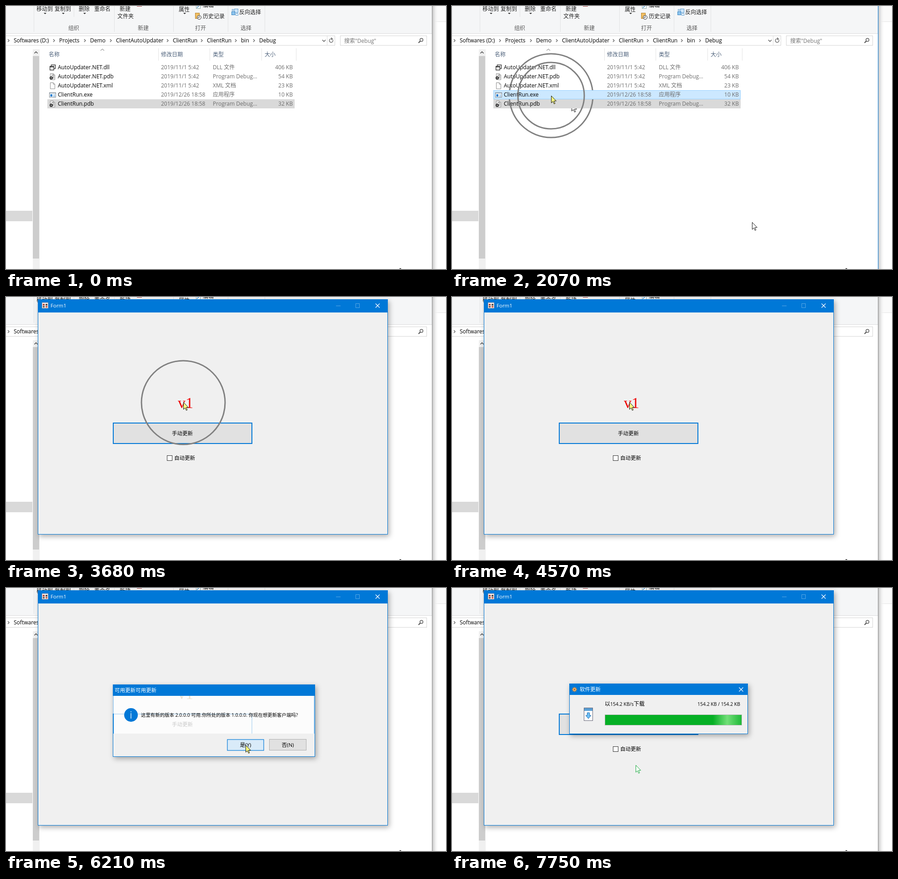
Recreate the animation shown at these times as an HTML page. Size 968x578 px, loop 8 s.

```html
<!DOCTYPE html>
<html lang="zh-CN">
<head>
<meta charset="utf-8">
<title>Client update</title>
<style>
html, body { margin: 0; width: 100%; height: 100%; overflow: hidden; background: #fff; }
svg { display: block; width: 100vw; height: 100vh; }
text { font: 12px 'Open Sans', 'Noto Sans CJK SC', 'Noto Sans CJK', sans-serif; white-space: pre; }
.window { filter: drop-shadow(3px 4px 6px rgba(0, 0, 0, .32)); }
</style>
</head>
<body>
<svg id="stage" viewBox="0 0 968 578" xmlns="http://www.w3.org/2000/svg"></svg>
<script>
const BLUE = '#0078d7';
const LOOP = 8000;

// Markup helpers
const rect = (x, y, w, h, fill, stroke = 'none', extra = '') =>
  `<rect x="${x}" y="${y}" width="${w}" height="${h}" fill="${fill}" stroke="${stroke}" ${extra}/>`;
const text = (x, y, value, fill = '#000', extra = '') =>
  `<text x="${x}" y="${y}" fill="${fill}" ${extra}>${value}</text>`;
const line = (d, stroke, width = 1, extra = '') =>
  `<path d="${d}" fill="none" stroke="${stroke}" stroke-width="${width}" ${extra}/>`;
const shape = (d, fill) => `<path d="${d}" fill="${fill}"/>`;
const group = (id, content, extra = '') => `<g id="${id}" ${extra}>${content}</g>`;
const circle = (x, y, r, fill, extra = '') => `<circle cx="${x}" cy="${y}" r="${r}" fill="${fill}" ${extra}/>`;
const cross = (x, y, r, color, extra = '') =>
  line(`M${x - r} ${y - r}l${2 * r} ${2 * r}m0 ${-2 * r}l${-2 * r} ${2 * r}`, color, 1.2, extra);
const size = px => `style="font-size:${px}px"`;

const ARROW = 'M.5.5V16L4 12.7 6.6 18.2 8.8 17.2 6.3 11.8H11.3Z';
const arrow = (x, y, extra = '') =>
  `<path d="${ARROW}" transform="translate(${x} ${y})" fill="#fff" stroke="#111" stroke-linejoin="round" ${extra}/>`;

// Explorer
function ribbon() {
  const labels = [
    [67, 11, '移动到'], [107, 11, '复制到'], [160, 11, '删除'], [194, 11, '重命名'], [250, 11, '新建'],
    [245, 27, '文件夹'], [380, 12, '属性'], [433, 3, '编辑'], [433, 27, '历史记录'], [513, 18, '反向选择']];
  const groups = [[137, '组织'], [290, '新建'], [416, '打开'], [516, '选择']];
  return rect(0, 0, 938, 60, '#f5f6f7') + line('M0 60.5H938', '#dadbdc') +
    line('M61.5 0V57M149.5 0V24M238.5 0V57M368.5 0V57M488.5 0V57M569.5 0V57', '#e1e2e3') +
    labels.map(([x, y, s]) => text(x, y, s, '#222')).join('') +
    groups.map(([x, s]) => text(x, 53, s, '#5a5a5a')).join('') +
    [86, 126, 173, 393].map(x => shape(`M${x - 3} 15h6l-3 3z`, '#333')).join('') +
    rect(288, 0, 11, 1, '#a33c3c') +
    rect(418.5, -4.5, 9, 10, '#fff', '#8aa') + line('M420 4l6-6', '#4a90c8', 1.5) +
    rect(416.5, 15.5, 9, 12, '#f2bf62', '#b58432') + circle(425, 25, 4.5, '#eee', 'stroke="#333"') +
    line('M425 22v3l-3 1', '#333') +
    rect(502.5, 6.5, 8, 8, '#cfe6f8', '#5b9bd0') + rect(496.5, 12.5, 7, 7, '#8cc4ee', '#3b85c0') +
    rect(505.5, 16.5, 5, 4, '#fff', '#5b9bd0') + rect(497.5, 7.5, 3, 3, '#fff', '#5b9bd0');
}

function addressBar() {
  const crumbs = [[17, 'Softwares (D:)'], [117, 'Projects'], [185, 'Demo'], [242, 'ClientAutoUpdater'],
    [367, 'ClientRun'], [442, 'ClientRun'], [517, 'bin'], [557, 'Debug']];
  return rect(-1, 65.5, 724.5, 21, '#fff', '#d5d5d5') + line('M706.5 66V86', '#d9d9d9') +
    rect(735.5, 65.5, 190, 21, '#fff', '#d5d5d5') +
    crumbs.map(([x, s]) => text(x, 80, s) + line(`M${x - 13} 73l3 3-3 3`, '#555', 1.2)).join('') +
    line('M696 74.5l3.5 3.5 3.5-3.5', '#555', 1.4) +
    line('M718.5 73.5a4 4 0 1 1-4-1.5h3m-2-2.5l2.5 2.5-2.5 2.5', '#555', 1.2) +
    text(744, 81, '搜索"Debug"', '#757575') +
    circle(914, 74.5, 3.3, 'none', 'stroke="#444" stroke-width="1.3"') + line('M911.5 77l-4 4', '#444', 1.8);
}

const page = y => shape(`M97 ${y - 7}h7.5l3.5 3.5v10.5h-11z`, '#fff') +
  line(`M97.5 ${y - 6.5}h6.5l3.5 3.5v10h-10zM104 ${y - 6.5}v3.5h3.5`, '#8a8a8a');
const icons = {
  dll: y => rect(99.5, y - 5.5, 9, 8, '#fff', '#333', 'stroke-width="1.4"') +
    rect(96.7, y - 2.3, 8.5, 8, '#fff', '#333', 'stroke-width="1.4"') + rect(97, y - 2.5, 8, 2, '#333'),
  pdb: y => page(y) + circle(99.5, y + 3, 3.6, '#333') + line(`M100 ${y - 3}h5m-2 3h3m-3 3h3`, '#444', 1.2) +
    circle(99.5, y + 3, 1.2, '#ddd'),
  xml: page,
  exe: y => rect(95.5, y - 4.5, 14, 10, '#fff', '#7d8790') + rect(96, y - 4, 13, 1.5, '#b8c5d0') +
    rect(97.5, y - 1, 4.5, 5, '#1e7ed0') + line(`M104 ${y}h4m-4 2h4m-4 2h4`, '#6fa8d8')
};

function row(index, name, date, type, kb) {
  const y = 135 + index * 20;
  return icons[name.slice(-3)](y) + text(114, y + 4, name) + text(341, y + 4, date, '#6d6d6d') +
    text(455, y + 4, type, '#6d6d6d') + text(631, y + 4, kb + ' KB', '#6d6d6d', 'text-anchor="end"');
}

function explorer() {
  const columns = [[94, '名称'], [341, '修改日期'], [455, '类型'], [569, '大小']];
  return rect(0, 0, 968, 578, '#fff') + rect(938, 0, 30, 34, '#fafafa') + line('M938 34.5H968', '#e4e4e4') +
    rect(938, 0, 14, 578, 'url(#edge)') + rect(0, 0, 938, 578, '#fff') + ribbon() + addressBar() +
    rect(0, 450, 58, 23, '#d9d9d9') + rect(59, 95, 15, 483, '#f0f0f0') + rect(59, 110, 14, 445, '#cdcdcd') +
    line('M62.5 104l3.5-3.5 3.5 3.5', '#444', 1.5) +
    columns.map(([x, s]) => text(x, 111, s, '#4c607a')).join('') +
    line('M208 98l4-3.5 4 3.5', '#666') +
    line('M335.5 93V120M448.5 93V120M562.5 93V120M638.5 93V120', '#e3e3e3') +
    rect(91, 205, 544, 20, '#d9d9d9', 'none', 'id="lastRow"') +
    row(0, 'AutoUpdater.NET.dll', '2019/11/1 5:42', 'DLL 文件', 406) +
    row(1, 'AutoUpdater.NET.pdb', '2019/11/1 5:42', 'Program Debug...', 54) +
    row(2, 'AutoUpdater.NET.xml', '2019/11/1 5:42', 'XML 文档', 23) +
    row(4, 'ClientRun.pdb', '2019/12/26 18:58', 'Program Debug...', 32) +
    circle(218, 197, 92, 'none', 'id="ringTrail" stroke="#808080" stroke-width="3"') +
    rect(91.5, 185.5, 543, 19, 'none', 'none', 'id="exeRow"') +
    row(3, 'ClientRun.exe', '2019/12/26 18:58', '应用程序', 10) +
    line('M937.5 0V578', '#8c8c8c', 1, 'id="border"') +
    arrow(660, 475, 'id="trailA"') + arrow(263, 215, 'id="trailB" clip-path="url(#tail)"') +
    shape('M866 576l3 1 1 1h-4z', '#222');
}

// Windows
const versionLabel = color => text(378, 244, 'v1', color, `style="font:34px 'Liberation Serif',serif"`);
const updateButton = (fill, extra = '') =>
  rect(236, 277, 305, 45, fill, BLUE, 'stroke-width="2" ' + extra) + text(365, 304, '手动更新', '#000', size(11.5));

function form() {
  return rect(70.5, 5.5, 769, 516, '#f0f0f0', BLUE) + rect(70, 5, 770, 29, BLUE) +
    rect(79.5, 12.5, 13, 12, '#f4f4f4', '#c9a9a5') + rect(81, 15, 4, 4, '#b5483c') + rect(87, 15, 4, 4, '#555') +
    rect(81, 20, 4, 3, '#555') + rect(87, 20, 4, 3, '#c5523a') +
    text(98, 23, 'Form1', '#fff', size(11.5)) +
    group('dimmed', line('M726 19.5h10', '#fff') + rect(769.5, 14.5, 8, 9, 'none', '#fff')) +
    cross(817.5, 19, 4.5, '#fff') + versionLabel('#ee0808') + updateButton('#e1e1e1', 'id="updateButton"') +
    rect(354.5, 348.5, 11, 11, '#fff', '#333') + text(370, 358, '自动更新', '#000', size(11.5));
}

function confirmDialog() {
  // The form's controls stay faintly visible through the message area
  const ghost = group('ghost', versionLabel('#a08020') + updateButton('none'), 'opacity=".2" clip-path="url(#message)"');
  return rect(235.5, 212.5, 444, 158, '#f0f0f0', BLUE) + rect(236, 237, 443, 83, '#fcfcfc') + ghost +
    line('M236 237V276M678 237V320', '#a9cfee', 2) + line('M236 276V320', BLUE, 2) +
    rect(235, 212, 445, 25, BLUE) +
    text(239, 229, '可用更新可用更新', '#fff', size(11.5)) +
    circle(275, 279, 15, BLUE) + rect(274.3, 275, 1.3, 12, '#fff') + rect(274.3, 271, 1.3, 2, '#fff') +
    text(297, 283, '这里有新的版本 2.0.0.0 可用.你所处的版本 1.0.0.0. 你现在想更新客户端吗?', '#000', size(10.42)) +
    rect(487, 333, 80, 24, '#e1e1e1', BLUE, 'id="yesButton" stroke-width="2"') +
    text(527, 349, '是(Y)', '#000', 'text-anchor="middle" ' + size(11.5)) +
    rect(579.5, 332.5, 81, 24, '#e1e1e1', '#adadad') +
    text(620, 349, '否(N)', '#000', 'text-anchor="middle" ' + size(11.5));
}

function downloadDialog() {
  const rays = [0, 45, 90, 135].map(a => line('M264 223h11', '#d98a3c', 2, `transform="rotate(${a} 269.5 223)"`));
  return rect(258.5, 210.5, 392, 110, '#f0f0f0', BLUE) + rect(258, 210, 393, 25, BLUE) +
    rays.join('') + circle(269.5, 223, 3.6, '#f0b060') + circle(269.5, 223, 1.3, '#8a4a1a') +
    text(281, 227, '软件更新', '#fff', size(11.5)) + cross(636, 223, 4.5, '#fff') +
    rect(290.5, 263.5, 19, 28, '#fff', '#667') + rect(291, 264, 18, 6, '#5a9fd4') +
    `<path d="M297.5 274h5v6h3.5l-6 7-6-7h3.5z" fill="#6ec0f5" stroke="#1c6cb0"/>` +
    text(336, 259, '', '#000', 'id="speed"') +
    text(634, 259, '', '#000', 'id="amount" text-anchor="end" ' + size(10.4)) +
    rect(336.5, 278.5, 301, 23, '#e6e6e6', '#bcbcbc') +
    rect(337, 279, 0, 22, '#06b025', 'none', 'id="bar"') +
    rect(574, 279, 63, 22, 'url(#glow)', 'none', 'id="shine"');
}

stage.innerHTML = `<defs>
  <linearGradient id="edge"><stop stop-color="#c6c6c6"/><stop offset=".35" stop-color="#e6e6e6"/>
    <stop offset="1" stop-color="#fff" stop-opacity="0"/></linearGradient>
  <linearGradient id="glow"><stop stop-color="#06b025"/><stop offset=".5" stop-color="#72df78"/>
    <stop offset="1" stop-color="#1fb938"/></linearGradient>
  <clipPath id="message"><rect x="236" y="237" width="443" height="83"/></clipPath>
  <clipPath id="tail"><rect y="10" width="20" height="10"/></clipPath></defs>` +
  explorer() + group('form', form(), 'class="window"') + group('confirm', confirmDialog(), 'class="window"') +
  group('download', downloadDialog(), 'class="window"') +
  circle(0, 0, 0, 'none', 'id="ring" stroke="#808080" stroke-width="3"') + arrow(0, 0, 'id="pointer"');

// Timelines: [start, ...values], each held until the next entry
const WHITE = '#fff', YELLOW = '#ffff80';
const pointerKeys = [
  [0, 980, 600, WHITE], [100, 800, 560, WHITE], [210, 660, 475, WHITE], [320, 480, 370, WHITE],
  [430, 330, 262, WHITE], [540, 263, 215, WHITE], [650, 230, 201, WHITE], [760, 218, 197, WHITE],
  [1190, 218, 197, YELLOW], [1510, 218, 197, WHITE], [1720, 218, 197, YELLOW],
  [3050, 300, 200, WHITE], [3160, 390, 206, WHITE], [3270, 431, 211, WHITE], [3470, 390, 231, WHITE],
  [3680, 390, 231, YELLOW], [3900, 390, 231, WHITE], [4130, 390, 231, YELLOW], [4230, 390, 231, WHITE],
  [4450, 390, 231, YELLOW], [4910, 405, 270, WHITE], [5010, 420, 296, WHITE], [5350, 420, 296, YELLOW],
  [5450, 420, 296, WHITE], [5680, 527, 345, WHITE], [6210, 527, 345, YELLOW], [6430, 527, 345, WHITE],
  [7540, 460, 370, WHITE], [7650, 404, 389, WHITE]];
const ringKeys = [[0, 0], [1720, 92], [1850, 0], [2070, 73], [2180, 55], [2290, 36], [2400, 18], [2510, 0],
  [3680, 92], [3790, 73], [3900, 0], [4450, 92], [4570, 0]];
const barKeys = [[0, 0], [6650, 45], [6770, 90], [6890, 134], [6990, 175], [7090, 215], [7200, 255],
  [7540, 280], [7650, 300]];
const buttonKeys = [[0, '#e1e1e1'], [4910, '#e5f1fb'], [5350, '#cce4f7'], [5450, '#e1e1e1']];

const held = (keys, t) => keys.findLast(key => key[0] <= t).slice(1);
const set = (id, attributes) => {
  const node = document.getElementById(id);
  for (const name in attributes) node.setAttribute(name, attributes[name]);
};
const show = (id, visible) => set(id, { visibility: visible ? 'visible' : 'hidden' });

// Windows fade and grow in over three steps and reverse on close
function pose(id, t, opens, closes, cx, cy) {
  const grow = [[-1, 0, .9], [opens, .35, .964], [opens + 110, .87, .992], [opens + 220, 1, 1],
    [closes, .6, .98], [closes + 110, .2, .95], [closes + 220, 0, .9]];
  const [opacity, scale] = held(grow, t);
  show(id, opacity > 0);
  set(id, { opacity, transform: `translate(${cx} ${cy}) scale(${scale}) translate(${-cx} ${-cy})` });
}

function draw() {
  const t = performance.now() % LOOP;
  const launched = t >= 2830;
  const selected = t >= 650 && !launched;

  set('border', { stroke: t >= 100 && !launched ? BLUE : '#8c8c8c' });
  set('exeRow', { fill: selected ? '#cce8ff' : launched ? '#d9d9d9' : 'none', stroke: selected ? '#99d1ff' : 'none' });
  show('lastRow', !launched);
  show('ringTrail', t >= 1850 && !launched);
  show('trailA', t >= 210 && !launched);
  show('trailB', t >= 540 && !launched);

  pose('form', t, 2830, LOOP, 455, 263.5);
  set('dimmed', { opacity: t < 3050 ? 1 : .35 });
  set('updateButton', { fill: held(buttonKeys, t)[0] });

  pose('confirm', t, 5680, 6320, 457.5, 291.5);
  const pressed = t >= 6110;
  set('yesButton', { fill: pressed ? '#d9ebf9' : '#e1e1e1', 'stroke-width': pressed ? 1.2 : 2 });

  pose('download', t, 6540, LOOP, 454.5, 265.5);
  const received = t < 7540 ? '131.0' : '154.2';
  speed.innerHTML = `以<tspan style="font-size:10.5px">${received} KB/s</tspan>下载`;
  amount.textContent = `${received} KB / 154.2 KB`;
  set('bar', { width: held(barKeys, t)[0] });
  show('shine', t >= 7650);

  const [x, y, fill] = held(pointerKeys, t);
  set('pointer', { transform: `translate(${x} ${y})`, fill, stroke: t >= 7650 ? '#14a83a' : '#111' });
  set('ring', { cx: t < 3000 ? 218 : 390, cy: t < 3000 ? 197 : 232, r: held(ringKeys, t)[0] });
  requestAnimationFrame(draw);
}
draw();
</script>
</body>
</html>
```
